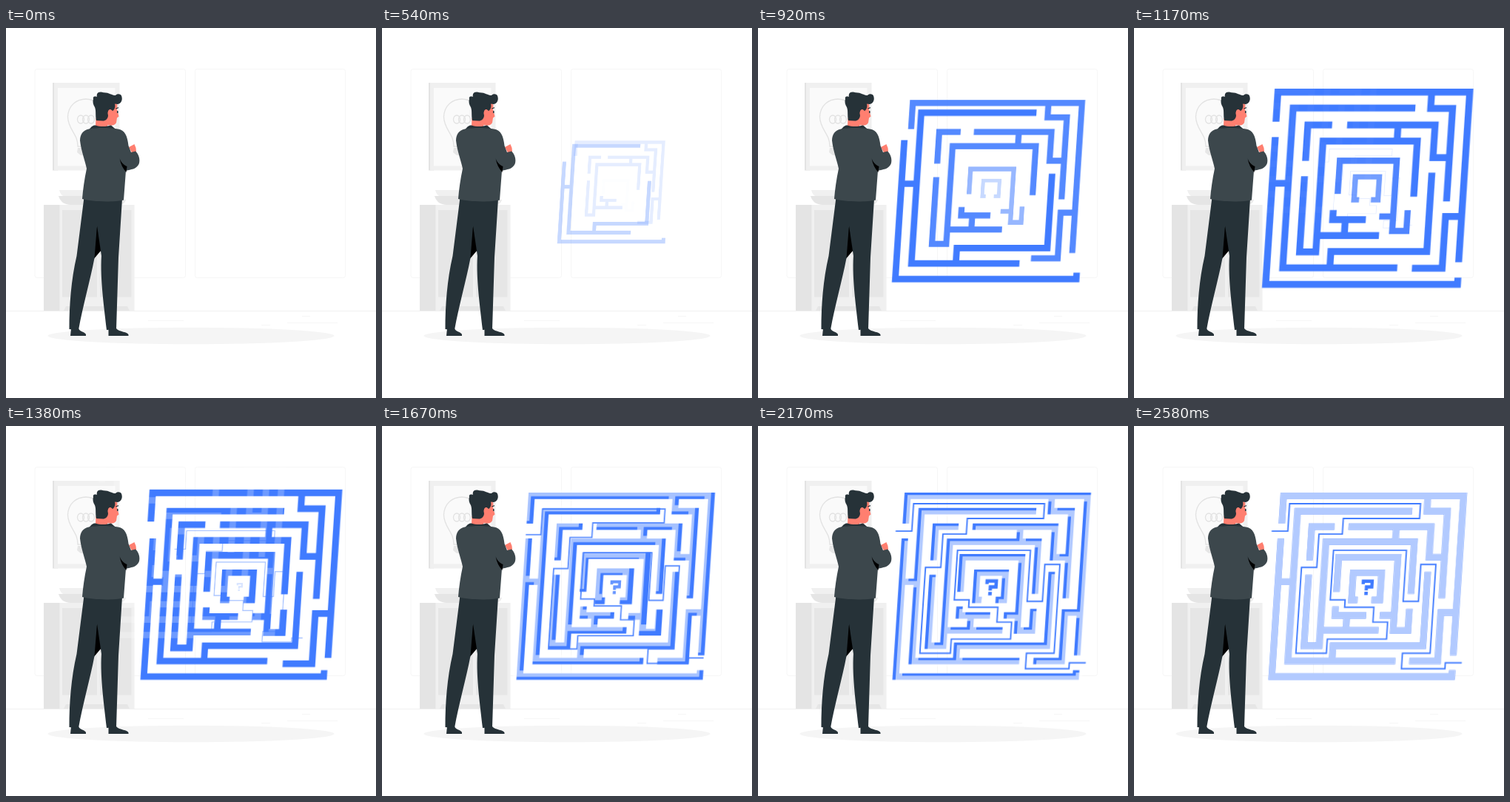
Recreate the animation shown at these times as an HTML page. Size 500x500 px, loop 2.68 s.

```html
<!DOCTYPE html>
<html lang="en">
<head>
<meta charset="utf-8">
<title>Thinking about a maze</title>
<style>
  html, body { margin: 0; width: 100%; height: 100%; overflow: hidden; background: #fff; }
  svg { display: block; width: 100%; height: 100%; }
  .wall { fill: none; stroke-width: 8.7; stroke-linejoin: miter; }
  .blue { stroke: #407bff; }
  .white { stroke: #fff; }
  #route, #mark { fill: none; stroke: #407bff; }
</style>
</head>
<body>
<svg viewBox="0 0 500 500">
  <!-- room -->
  <g fill="none" stroke="#f6f6f6">
    <rect x="39" y="55.500" width="203.500" height="282" rx="3"/>
    <rect x="255.500" y="55.500" width="203" height="282" rx="3"/>
    <path d="M0 382.500H500" stroke="#f0f0f0"/>
    <path d="M192 395.500H240M345 401.500H357M380 398.500H448M400 389.500H411"/>
  </g>
  <ellipse cx="250" cy="416" rx="193.500" ry="11.300" fill="#f5f5f5"/>

  <!-- framed bulb -->
  <path d="M63 74H70V192.500H63Z" fill="#e3e3e3"/>
  <path d="M65 74H153.500V192.500H65Z" fill="#f0f0f0"/>
  <path d="M70 81H147.500V186.500H70Z" fill="#fafafa"/>
  <g fill="none" stroke="#e2e2e2" stroke-width="1.300">
    <path d="M97 160C97 142 84 138 83.500 120C84 105 95 96 108 96S132 106 132 120C131 138 119 142 119 160Z"/>
    <ellipse cx="101" cy="123.500" rx="4.500" ry="5.500"/>
    <ellipse cx="108" cy="123.500" rx="4.500" ry="5.500"/>
    <ellipse cx="115" cy="123.500" rx="4.500" ry="5.500"/>
  </g>
  <path d="M97 162H119V168L115 172H101L96 168Z" fill="#e6e6e6"/>

  <!-- cabinet and bowls -->
  <path d="M72 219H138L132 228H80C75 227 73 223 72 219Z" fill="#f0f0f0"/>
  <path d="M71 227H125C123 236 116 239 110 239H88C78 239 73 234 71 227Z" fill="#e5e5e5"/>
  <path d="M120 232H162C161 236 158 239 154 239H126Z" fill="#ebebeb"/>
  <path d="M51 239H74V382H51Z" fill="#e4e4e4"/>
  <path d="M72.500 239H173.500V382H72.500Z" fill="#f0f0f0"/>
  <path d="M76 246H123V363.500H76ZM127 246H169.500V363.500H127Z" fill="#e6e6e6"/>
  <path d="M78 382L81 376H164L167 382Z" fill="#e6e6e6"/>

  <g id="maze"></g>

  <!-- man -->
  <g fill="#263238">
    <path d="M88 406H98C100 411 108 411 108 414.500V416H87Z"/>
    <path d="M138.500 406H149C153 411 165 410.500 165.500 414.500V416H138.500Z"/>
    <path d="M123 262L129 300L117 314Z" fill="#000"/>
    <path d="M105.500 229L95.500 308C88 340 85.500 375 85.500 407L98 408C104 375 114 340 119.500 311L123 267L129 308C127 340 133 380 136 408L149 407L152 310L157 231Z"/>
    <path d="M121.500 122H139L137 133C131 137 123 135 121 132Z" fill="#ff7f70"/>
    <path d="M135 106L148 101L150.500 104L150 110L152.500 119.500L150 121.500L149 128C147 132 141 132.500 137 131L134 122Z" fill="#ff7f70"/>
    <path d="M118 96C117 92.500 120 92 123 93C121.500 87.500 126 85.500 132 87.200C139 87 143 91 148 91C150 88.500 154.500 88.500 156 91.500C158 97 156 102 151 103L147 102.500C148.500 107 146 111.500 144 112C139 107.500 136.500 113 138 118C138 123 134 125.500 131 125.500L122 125C120.500 118 122 112 120 107C117.500 103 117 100 118 96Z"/>
    <ellipse cx="140.800" cy="115" rx="3" ry="5" fill="#ff7f70"/>
    <path d="M148 108.500L152 107V108.300L148.500 109.600ZM150 112H151.500V115H150Z"/>
    <path d="M166 161L173.500 157L175.500 162L176 167L171 170Z" fill="#ff7f70"/>
    <path d="M112 137.500C116 132 119 131 121 131.500C128 134 137 133 142 131.500L149 137.500Z"/>
    <path d="M112 136.500C104 138 100 144 100 152C101.500 166 107 180 109 190C106 204 104 218 103 231C116 235 146 235.500 159 232.500L162 193C169 191 176 191 179.500 184C182 178 179 170 175 166.500L169 168L165.500 159C164 146 161 138 151 136.500C138 134.500 124 134.500 112 136.500Z" fill="#3c474c"/>
    <path d="M153.500 176C155 181 159 185 163.500 187L162.500 195C158 190 155 184 153.500 176Z" fill="#000"/>
  </g>
</svg>
<script>
const LOOP = 2680;
const BACK = 'cubic-bezier(.3,.1,.45,1.52)';
const SHEAR = 'transform="matrix(1 0 -.0655 1 5.9 0)"';

// upright wall runs; SHEAR leans them over
const walls = {
  a: 'M202.500 152V338.500H445.700V330M202.500 210.500H222.800' +
     'M377.600 115H222.800V317.700H368M404 197V297H282.500V317.700',
  b: 'M202.500 132V94.300H445.700V310M397.500 94.300V115H425.300V233' +
     'M293 136H404.500V177.300H425.300M357.600 136V156.500' +
     'M383.300 227V156.500H263.800V297H243.200V201M263.800 276.300H342.500M298.500 256V276.300' +
     'M243.200 181.500V136H274M282.500 244V256H324.500M445.700 252H425.300V317.700H387',
  c: 'M282.300 224V177.300H362.500V276.300H382.500V247M343 256H362.500',
  d: 'M311.500 235H303.300V198.200H341.700V235H330.500'
};
const route = 'M189.400 142H211.300V105H388.200V125H285.200V146H253.600V191H233V307H274.200' +
  'V288H354.200V265H334.300V245H294.800V235H274.700V168H373.300V237H394V187H414.300V307H377V328H435.800V320H458';

const maze = document.getElementById('maze');
const draw = (id, cls) => `<path class="wall ${cls}" d="${walls[id]}" ${SHEAR}/>`;
const ids = Object.keys(walls);
maze.innerHTML =
  ids.map(id => `<g id="${id}">${draw(id, 'blue')}</g>`).join('') +
  `<g id="sheen">${ids.map(id => draw(id, 'white')).join('')}</g>` +
  `<g id="route"><path d="${route}" stroke-width="1.900" ${SHEAR}/></g>` +
  `<g id="mark"><path d="M317.800 213.700V209.700H329.700V217.500H322.500V222.300M320.200 226.200H324.800" stroke-width="4.400" ${SHEAR}/></g>`;

function run(id, frames) {
  document.getElementById(id).animate(
    frames.map(({ at, ...rest }) => ({ offset: at / LOOP, ...rest })),
    { duration: LOOP, iterations: Infinity });
}

function pop(id, x, y, start, length, easing = BACK) {
  document.getElementById(id).style.transformOrigin = `${x}px ${y}px`;
  const small = { transform: 'scale(.4)', opacity: 0 };
  const full = { transform: 'scale(1)', opacity: 1 };
  run(id, [
    { at: 0, ...small }, { at: start, ...small, easing },
    { at: start + length, ...full }, { at: LOOP, ...full }
  ]);
}

pop('a', 312.5, 220, 310, 1060);
pop('b', 319.5, 211, 395, 1060);
pop('c', 316, 226, 500, 1300);
pop('d', 315.5, 217, 640, 1300);
pop('route', 314, 217, 980, 900, 'cubic-bezier(.36,.05,.6,1)');
pop('mark', 316, 217, 1200, 1060);

// pale layer slides in from the upper left, overshoots, settles
const slide = (x, y, opacity) => ({ transform: `translate(${x}px,${y}px)`, opacity });
run('sheen', [
  { at: 0, ...slide(-123, -98, 0) },
  { at: 1060, ...slide(-123, -98, 0), easing: 'cubic-bezier(.36,0,.5,1)' },
  { at: 1880, ...slide(8, 6.5, .6), easing: 'cubic-bezier(.4,0,.6,1)' },
  { at: 2460, ...slide(0, 0, .6) },
  { at: LOOP, ...slide(0, 0, .6) }
]);
</script>
</body>
</html>
```
